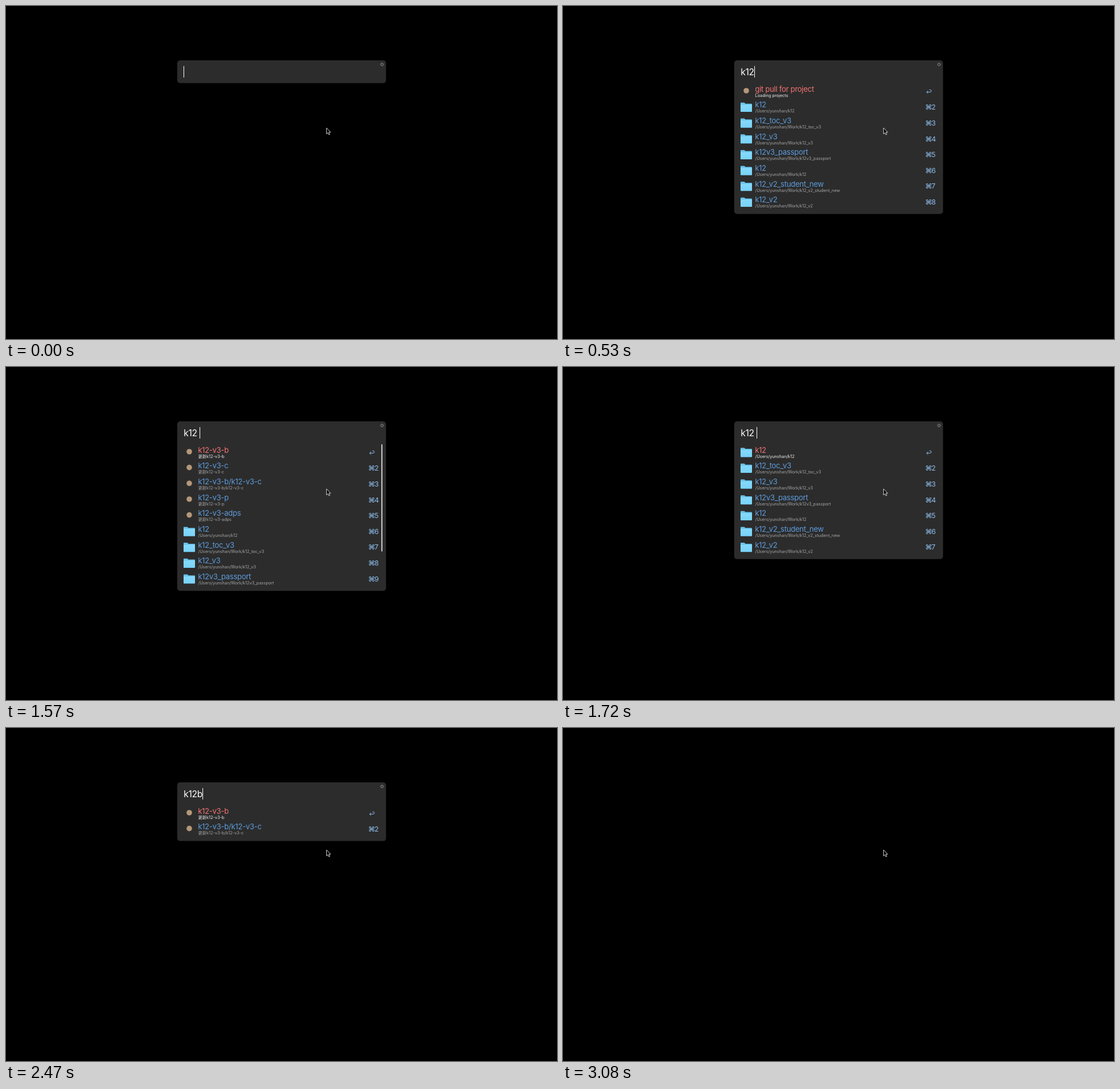
Animation of 962x582 px, one loop 8000 ms. Source, as an HTML page:

```html
<!DOCTYPE html>
<html lang="en">
<head>
<meta charset="utf-8">
<title>Project launcher</title>
<style>
  html, body { margin: 0; width: 100%; height: 100%; overflow: hidden; background: #000; }
  svg { display: block; width: 962px; height: 582px; }
  text { font-family: Inter, "Noto Sans CJK SC", "Noto Sans CJK", "DejaVu Sans", sans-serif; white-space: pre; }
  .query { font-size: 15.5px; letter-spacing: -.3px; fill: #fff; }
  .title { font-size: 13px; letter-spacing: -.26px; fill: #5d9cdb; }
  .sub { font-size: 7.3px; fill: #a6a6a6; }
  .key { font-size: 12.3px; fill: #8dbdec; }
  .picked .title { fill: #f57373; }
  .picked .sub { fill: #f0f0f0; }
</style>
</head>
<body>
<svg viewBox="0 0 962 582" xmlns="http://www.w3.org/2000/svg">
  <defs>
    <linearGradient id="front" x2="0" y2="1">
      <stop offset="0" stop-color="#86daFB"/>
      <stop offset="1" stop-color="#78d2f8"/>
    </linearGradient>
    <g id="folder">
      <path d="M310 142.2q0-1 1-1h5.2q.8 0 1.3.7l.8 1.1h10.6q1.1 0 1.1 1v4H310z" fill="#68c3ea"/>
      <path d="M310 144.8h20v11.6q0 1-1 1h-18q-1 0-1-1z" fill="url(#front)"/>
    </g>
    <circle id="repo" cx="320" cy="148" r="4.8" fill="#b4977a"/>
    <path id="enter" d="M635 150.5h6a2 2 0 0 0 0-4h-1.4M637.4 148l-2.6 2.5 2.6 2.5" fill="none" stroke="#8dbdec"/>
  </defs>
  <rect width="962" height="582"/>
  <g id="panel">
    <rect id="box" x="299" y="95" width="364.5" rx="5" fill="#2c2c2c"/>
    <g fill="none" stroke="#858585">
      <circle cx="656.5" cy="102.2" r="2" stroke-width="1"/>
      <circle cx="656.5" cy="102.2" r="2.9" stroke-width=".7" stroke-dasharray="1.1 1.178"/>
    </g>
    <text id="query" class="query" x="310.3" y="120.6"></text>
    <rect id="caret" y="105" width="1" height="20" fill="#fff"/>
    <g id="rows"></g>
    <rect id="bar" x="655.5" y="135" width="1.6" height="187.5" rx=".8" fill="#f2f2f2"/>
  </g>
  <path d="M559.6 213v10.6l2.4-2.2 1.6 3.6 1.8-.8-1.6-3.5h3z" fill="#000" stroke="#fff" stroke-width=".8" stroke-linejoin="round"/>
</svg>
<script>
const LOOP = 8000, PITCH = 27.65, HOME = '/Users/yunshan/';
const el = id => document.getElementById(id);

const folder = (title, dir = 'Work/') => ({ icon: 'folder', title, sub: HOME + dir + title });
const repo = title => ({ icon: 'repo', title, sub: '更新' + title });

const folders = [
  folder('k12', ''),
  ...['k12_toc_v3', 'k12_v3', 'k12v3_passport', 'k12', 'k12_v2_student_new', 'k12_v2'].map(t => folder(t))
];
const repos = ['k12-v3-b', 'k12-v3-c', 'k12-v3-b/k12-v3-c', 'k12-v3-p', 'k12-v3-adps'].map(repo);
const loading = { icon: 'repo', title: 'git pull for project', sub: 'Loading projects' };
const projects = [...repos, ...folders.slice(0, 4)];
const matches = [repos[0], repos[2]];

// start time, query, caret x (0 = hidden), results
const steps = [
  [0, '', 310, []],
  [290, 'k1', 325, folders.slice(0, 5)],
  [530, 'k12', 334, [loading, ...folders]],
  [680, 'k12', 334, projects],
  [1130, 'k12', 0, projects],
  [1570, 'k12 ', 338, projects],
  [1720, 'k12 ', 338, folders],
  [2170, 'k12', 334, projects],
  [2320, 'k12b', 343, projects],
  [2470, 'k12b', 343, matches],
  [2920, 'k12b', 0, matches],
  [3080, null, 0, []]
];

function row({ icon, title, sub }, i) {
  const key = i
    ? `<text class="key" x="638.3" y="153.6" text-anchor="middle">⌘</text>
       <text class="key" x="643.2" y="153.6">${i + 1}</text>`
    : '<use href="#enter"/>';
  return `<g class="${i ? '' : 'picked'}" transform="translate(0 ${i * PITCH})">
    <use href="#${icon}"/>
    <text class="title" x="335.2" y="149.8">${title}</text>
    <text class="sub" x="335.5" y="158.7">${sub}</text>${key}</g>`;
}

let shown;
function draw(time) {
  const step = steps.findLast(s => s[0] <= time);
  if (step === shown) return;
  shown = step;
  const [, query, caret, results] = step;
  const n = results.length;
  el('panel').style.display = query === null ? 'none' : '';
  el('box').setAttribute('height', n ? 47.3 + n * PITCH : 39.7);
  el('query').textContent = query;
  el('caret').setAttribute('x', caret);
  el('caret').style.display = caret ? '' : 'none';
  el('rows').innerHTML = results.map(row).join('');
  el('bar').style.display = n > 8 ? '' : 'none';
}

const start = performance.now();
function tick() {
  draw((performance.now() - start) % LOOP);
  requestAnimationFrame(tick);
}
tick();
</script>
</body>
</html>
```
